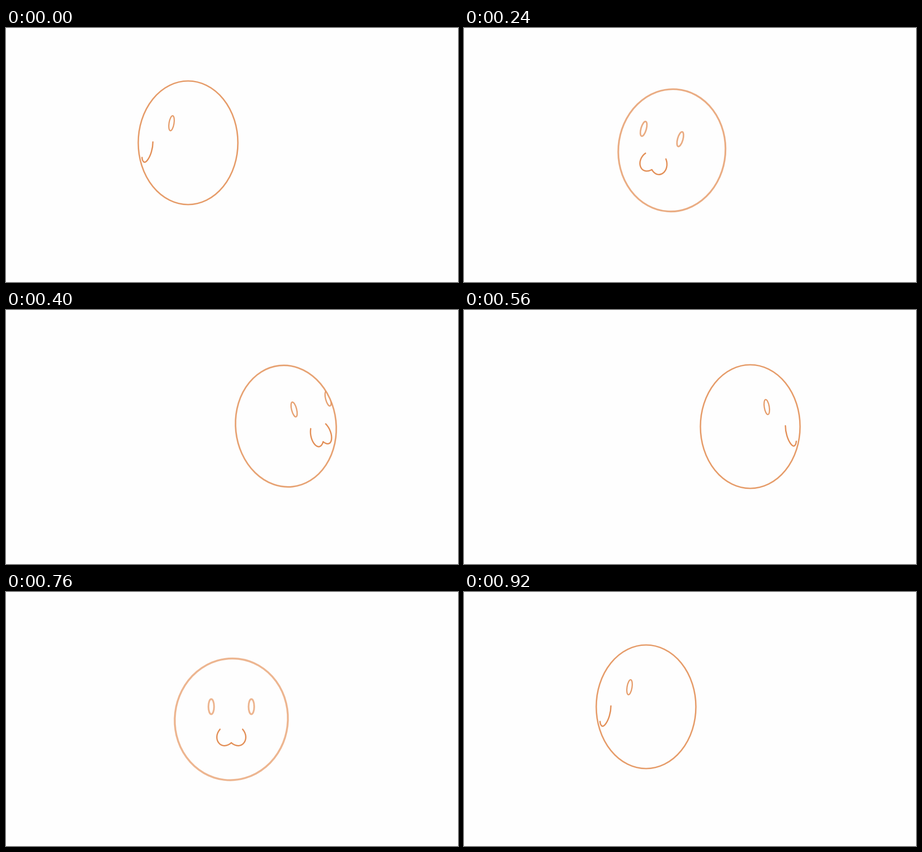
These frames come from a looping animation (998x561 px, 0.96 s). An HTML page with a canvas:

```html
<!DOCTYPE html>
<html>
<head>
<meta charset="utf-8">
<style>
  html, body { margin: 0; width: 100%; height: 100%; overflow: hidden; background: #fefefe; }
  canvas { display: block; }
</style>
</head>
<body>
<canvas id="stage" width="998" height="561"></canvas>
<script>
const ctx = document.getElementById('stage').getContext('2d');
const STEP = 40, STEPS = 24, LAST = 14, MIDDLE = 7;

// Swing from left to right: step, head x, y, rx, ry, and turn (-1 left, 1 right)
const KEYS = [
  [0, 402, 253.5, 110, 136.5, -1],
  [4, 413, 257, 110.5, 136, -.78],
  [7, 497.5, 281.2, 124.8, 134.5, 0],
  [8, 568, 274.5, 107, 131.5, .42],
  [10, 618, 256.5, 111, 134.5, .78],
  [14, 632, 257.5, 110, 136.5, 1]
];

// Slow at both ends of the swing, fast in the middle
function headAt(step) {
  const next = Math.max(1, KEYS.findIndex(key => key[0] >= step));
  const a = KEYS[next - 1], b = KEYS[next];
  const t = (step - a[0]) / (b[0] - a[0]);
  const k = step < MIDDLE ? t ** 1.5 : 1 - (1 - t) ** 1.5;
  return a.map((v, i) => v + (b[i] - v) * k).slice(1);
}

// The way back skips the slow ends of the way out
function swingStep(step) {
  if (step <= LAST) return step;
  return step === STEPS - 1 ? 0 : 26 - step;
}

function stroke(width, alpha) {
  ctx.strokeStyle = `rgba(226, 140, 82, ${alpha})`;
  ctx.lineWidth = width;
  ctx.stroke();
}

function oval(x, y, rx, ry, tilt, width, alpha) {
  ctx.beginPath();
  ctx.ellipse(x, y, rx, ry, tilt, 0, Math.PI * 2);
  stroke(width, alpha);
}

// One half of the mouth: side -1 is near, 1 is far
function lobe(side, sx, sy) {
  const p = (x, y) => [x * side * sx, y * sy];
  ctx.beginPath();
  ctx.moveTo(...p(25, 0));
  ctx.bezierCurveTo(...p(43, 21), ...p(23, 49), ...p(0, 30));
  stroke(3, .95);
}

function draw(now) {
  const step = Math.floor(now % (STEP * STEPS) / STEP);
  const [x, y, rx, ry, turn] = headAt(swingStep(step));
  const u = Math.abs(turn), soft = 1 - u;
  const alpha = .85 - .22 * soft;

  ctx.clearRect(0, 0, 998, 561);
  ctx.save();
  ctx.lineCap = ctx.lineJoin = 'round';
  ctx.translate(x, y);
  if (turn > 0) ctx.scale(-1, 1);

  const lean = u ? .22 * (u - u ** 5) : .12;
  oval(0, 0, rx, ry, lean, 3.2 + soft, alpha);
  ctx.clip();

  // The flat face slides sideways over the rolled head
  ctx.rotate(.31 * Math.tanh(4 * u));
  ctx.translate(-87 * u, 0);
  for (const side of [-1, 1]) {
    oval(side * .355 * rx, -28 - 2 * u, .05 * rx, 16.7, -.15 * u ** 4, 2.8 + soft, alpha);
  }
  ctx.translate(0, 22);
  const sx = 1 - .5 * u * u, sy = 1 + .33 * u * u;
  lobe(1, sx, sy);
  if (u < .9) lobe(-1, sx, sy); // the far half slips behind the edge
  ctx.restore();
}

function tick() {
  draw(performance.now());
  requestAnimationFrame(tick);
}
tick();
</script>
</body>
</html>
```
